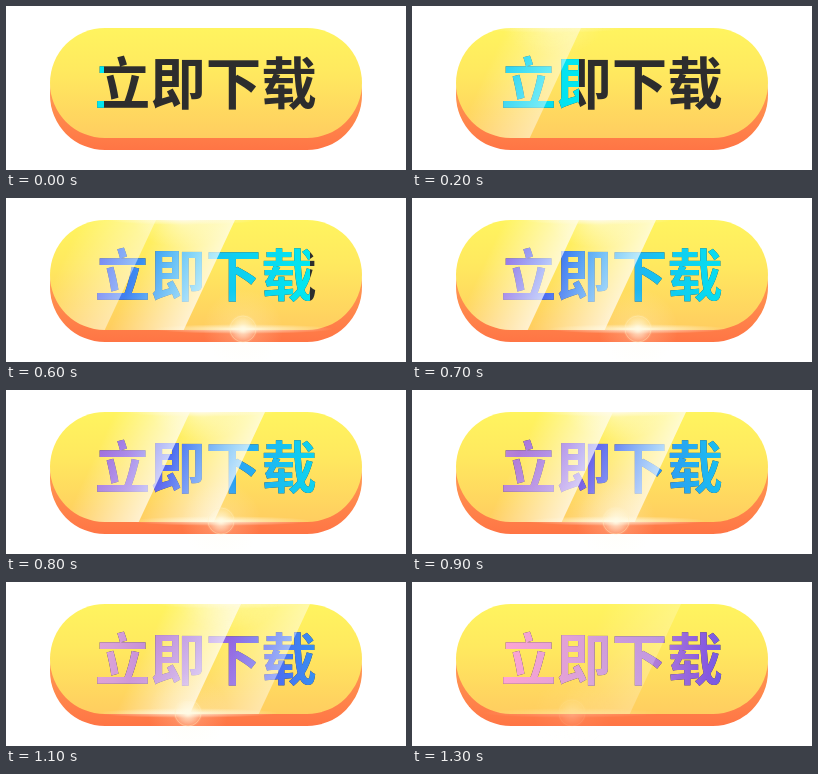
These frames come from a looping animation (400 by 164 pixels, 1.4 s). An HTML page:

```html
<!DOCTYPE html>
<html lang="zh-CN">
<head>
<meta charset="utf-8">
<style>
  html, body { margin: 0; width: 100%; height: 100%; overflow: hidden; background: #fff; }
  svg { display: block; width: 400px; height: 164px; }
  text { font: bold 55.5px "Noto Sans CJK SC", "Noto Sans CJK", sans-serif; }
</style>
</head>
<body>
<svg viewBox="0 0 400 164">
  <defs>
    <linearGradient id="face" x2="0" y2="1">
      <stop stop-color="#fff45f"/><stop offset=".4" stop-color="#ffe95f"/><stop offset="1" stop-color="#ffcd60"/>
    </linearGradient>
    <linearGradient id="rim" x2="0" y2="1">
      <stop stop-color="#ffb45c"/><stop offset="1" stop-color="#ff7545"/>
    </linearGradient>
    <linearGradient id="ink" gradientUnits="userSpaceOnUse" x1="0" x2="-480" y1="0" y2="0">
      <stop stop-color="#00e8f0" stop-opacity="0"/>
      <stop stop-color="#00e8f0"/>
      <stop offset=".16" stop-color="#10cdf0"/>
      <stop offset=".32" stop-color="#2f9cf2"/>
      <stop offset=".44" stop-color="#5068f0"/>
      <stop offset=".52" stop-color="#8659e0"/>
      <stop offset=".64" stop-color="#b47fd8"/>
      <stop offset=".77" stop-color="#d8a0d8"/>
      <stop offset=".95" stop-color="#ffa4d2"/>
    </linearGradient>
    <linearGradient id="shine">
      <stop stop-color="#fff" stop-opacity="0"/><stop offset="1" stop-color="#fff" stop-opacity=".7"/>
    </linearGradient>
    <radialGradient id="glow">
      <stop stop-color="#fffbe6"/><stop offset=".3" stop-color="#fffbe6" stop-opacity=".6"/>
      <stop offset="1" stop-color="#fffbe6" stop-opacity="0"/>
    </radialGradient>
    <clipPath id="pill"><rect x="44" y="22" width="312" height="110" rx="55"/></clipPath>
  </defs>
  <rect x="44" y="34" width="312" height="110" rx="55" fill="url(#rim)"/>
  <rect x="44" y="22" width="312" height="110" rx="55" fill="url(#face)"/>
  <text x="88.7" y="97.6" fill="#2d2d2d">立即下载</text>
  <text x="88.7" y="97.6" fill="url(#ink)" aria-hidden="true">立即下载</text>
  <g clip-path="url(#pill)" fill="url(#shine)">
    <rect id="lead" x="-75" width="75" height="110"/>
    <rect id="trail" x="-75" width="75" height="110"/>
  </g>
  <g clip-path="url(#pill)">
    <g id="top" fill="url(#glow)">
      <ellipse rx="75" ry="5"/><ellipse rx="50" ry="28" opacity=".6"/>
    </g>
  </g>
  <g id="flare" fill="url(#glow)">
    <ellipse rx="90" ry="5"/><circle r="40" opacity=".3"/><circle r="15"/>
    <circle r="13" fill="none" stroke="#fff0c0" stroke-opacity=".4"/>
  </g>
</svg>
<script>
const LOOP = 1400, STEP = 100;
const SLANT = -25; // degrees
const el = id => document.getElementById(id);

// Ramps up over a..b, holds, ramps down over c..d
const fade = (t, a, b, c, d) => Math.max(0, Math.min(1, (t - a) / (b - a), (d - t) / (d - c)));

function place(id, x, y, alpha, skew = 0) {
  el(id).setAttribute('transform', `translate(${x} ${y}) skewX(${skew})`);
  el(id).setAttribute('opacity', alpha);
}

function draw(now) {
  const t = Math.floor(now % LOOP / STEP) * STEP;
  el('ink').setAttribute('gradientTransform', `translate(${98 + 0.344 * t})`);
  place('lead', 139 + 0.15 * t, 22, fade(t, 0, 300, 1000, 1300), SLANT);
  place('trail', 48 + 0.17 * t, 22, fade(t, 400, 700, 1100, 1400), SLANT);
  place('top', 123 + 0.09 * t, 22, fade(t, 0, 400, 1000, 1300));
  place('flare', 303 - 0.11 * t, 131, fade(t, 400, 600, 1100, 1400));
  requestAnimationFrame(draw);
}
draw(0);
</script>
</body>
</html>
```
